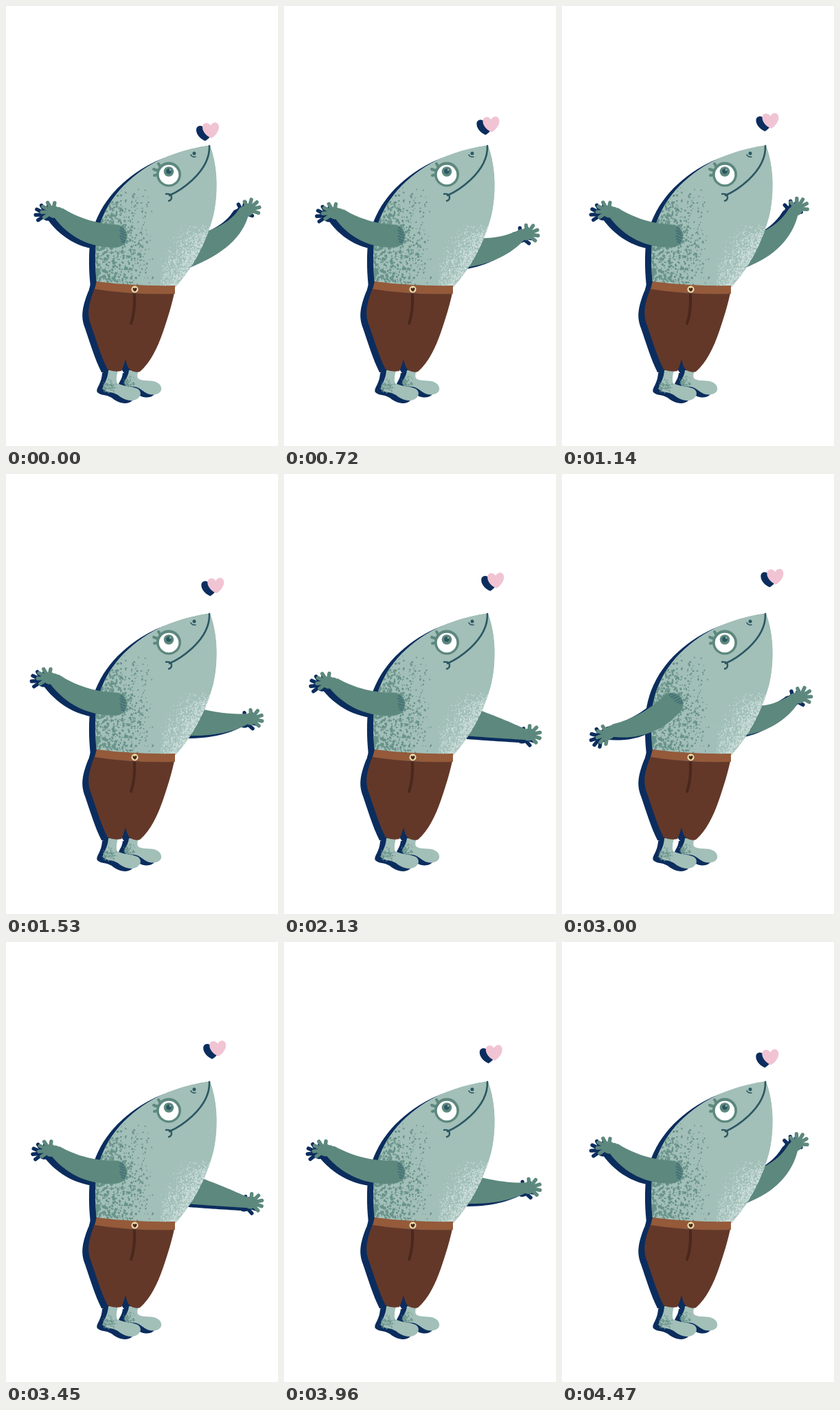
These frames come from a looping animation (396x639 px, 4500 ms). An HTML page with a canvas:

```html
<!DOCTYPE html>
<html lang="en">
<head>
<meta charset="utf-8">
<title>Fish blowing a heart</title>
<style>
html, body { margin: 0; width: 100%; height: 100%; overflow: hidden; background: #fff; }
canvas { display: block; width: 396px; height: 639px; }
</style>
</head>
<body>
<canvas id="stage" width="396" height="639"></canvas>
<script>
const ctx = document.getElementById('stage').getContext('2d');
const LOOP = 4500, TURN = 2790, STEP = 30;
const NAVY = '#0b2d5e', SKIN = '#a2bfb8', DEEP = '#5d887d', SPOT = '#68938a', INK = '#2b5863';
const PANTS = '#633829', BELT = '#945a3a', PINK = '#f1c4d3';
const rad = Math.PI / 180;

const body = new Path2D('M297 202 C262 207 232 217 206 233 C165 259 137 295 131 342 C129 365 130 385 132 404 L246 409 C272 381 292 343 302 305 C310 270 308 230 297 202Z');
const pants = new Path2D('M129 410 C119 435 118 448 124 464 C131 484 138 508 148 528 Q158 532 168 530 Q171 524 174 513 Q176 524 181 529 Q189 533 195 531 C211 517 221 495 228 475 C236 452 241 435 245 417 L187 418Z');
const belt = new Path2D('M132 400 Q185 407 246 406 L246 418 Q185 420 129 411Z');
const nearFoot = new Path2D('M149 529 L163 529 C161 537 160 543 162 548 C172 553 184 552 192 556 C199 561 196 569 188 572 C179 575 169 570 163 565 C155 560 147 562 142 557 C139 551 148 546 149 529Z');
const farFoot = new Path2D('M179 529 L193 529 C191 535 190 540 194 542 C204 546 214 542 222 548 C229 554 227 562 218 564 C208 566 202 561 195 556 C187 550 178 555 173 550 C171 543 178 540 179 529Z');
const heart = new Path2D('M1 11 C-4 9 -12 3 -12 -5 C-12 -12 -3 -13 0 -7 C3 -14 12 -13 12 -5 C12 2 6 8 1 11Z');

// Columns: time, then the pose values.
const leftKeys = [
  // drop in degrees, reach
  [0, 0, 1], [720, 0, .945], [1110, 0, 1.01], [1530, 0, 1.07],
  [1800, 14, 1.11], [2130, 3, 1.03], [2250, 49, 1.03], [2580, 46, 1.05], [2790, 46, 1.05]
];
const rightKeys = [
  // elbow x, y, wrist x, y, hand angle
  [0, 329, 339, 346, 299, -25], [540, 322, 352, 357, 318, -12],
  [720, 314, 357, 346, 332, -5], [1110, 318, 343, 336, 299, -42],
  [1530, 314, 366, 349, 356, -2], [2130, 309, 368, 349, 378, 5],
  [2220, 308, 372, 347, 390, 10], [2580, 309, 357, 339, 326, -15],
  [2790, 312, 352, 337, 316, -24]
];

function pose(keys, t) {
  let i = 1;
  while (i < keys.length - 1 && t > keys[i][0]) i++;
  const a = keys[i - 1], b = keys[i];
  const u = Math.min(1, (t - a[0]) / (b[0] - a[0]));
  const e = u * u * (3 - 2 * u);
  return a.slice(1).map((v, k) => v + (b[k + 1] - v) * e);
}

let seed = 7;
function random() {
  seed = (seed * 16807) % 2147483647;
  return seed / 2147483647;
}

// Spots grow with the local density.
function stipple(count, x0, y0, w, h, density, minSize, maxSize) {
  const path = new Path2D();
  for (let i = 0; i < count; i++) {
    const x = x0 + random() * w, y = y0 + random() * h;
    const d = density(x, y);
    if (random() > d) continue;
    const r = minSize + random() * (maxSize - minSize) * (.4 + .6 * d);
    const tilt = random() * 3;
    path.moveTo(x + r * Math.cos(tilt), y + r * Math.sin(tilt));
    path.ellipse(x, y, r, r * (.55 + random() * .4), tilt, 0, 7);
  }
  return path;
}

const darkSpots = stipple(2000, 128, 264, 96, 142,
  (x, y) => Math.max(0, 1 - (x - 130) / 86) * Math.min(1, (y - 220) / 90), .7, 2.7);
const lightSpots = stipple(3000, 225, 318, 78, 90, (x, y) => {
  const inward = (302 - (y - 315) * .62 - x) / 50;
  return inward > 1 ? 0 : Math.pow(1 - Math.max(0, inward), 1.4) * Math.min(1, (y - 300) / 40);
}, .5, 1.4);
const heelSpots = stipple(260, 140, 541, 22, 21,
  (x, y) => 1 - Math.hypot(x - 149, y - 553) / 13, .5, 1.5);
const farHeelSpots = stipple(200, 171, 537, 20, 18,
  (x, y) => 1 - Math.hypot(x - 178, y - 547) / 12, .5, 1.5);

function fill(path, color) {
  ctx.fillStyle = color;
  ctx.fill(path);
}

function disc(x, y, r, color) {
  ctx.fillStyle = color;
  ctx.beginPath();
  ctx.arc(x, y, r, 0, 7);
  ctx.fill();
}

function line(d, width, color) {
  ctx.strokeStyle = color;
  ctx.lineWidth = width;
  ctx.stroke(new Path2D(d));
}

// Tapered limb along a quadratic curve.
function limb(s, c, w, r0, r1, r2, color) {
  const upper = [], lower = [];
  for (let i = 0; i <= 16; i++) {
    const u = i / 16, v = 1 - u;
    const mix = (a, b, d) => v * v * a + 2 * u * v * b + u * u * d;
    const x = mix(s[0], c[0], w[0]), y = mix(s[1], c[1], w[1]);
    const dx = v * (c[0] - s[0]) + u * (w[0] - c[0]);
    const dy = v * (c[1] - s[1]) + u * (w[1] - c[1]);
    const k = mix(r0, r1, r2) / Math.hypot(dx, dy);
    upper.push([x + dy * k, y - dx * k]);
    lower.unshift([x - dy * k, y + dx * k]);
  }
  ctx.beginPath();
  upper.concat(lower).forEach(p => ctx.lineTo(p[0], p[1]));
  ctx.closePath();
  ctx.fillStyle = color;
  ctx.fill();
}

function hand(x, y, angle, side, color) {
  ctx.save();
  ctx.translate(x, y);
  ctx.rotate(angle);
  ctx.scale(1, side);
  disc(0, 0, 8, color);
  disc(7, 0, 9, color);
  ctx.strokeStyle = color;
  ctx.lineWidth = 5.4;
  [[-92, 13], [-50, 15], [-17, 16], [13, 16], [44, 15]].forEach(([a, len]) => {
    ctx.beginPath();
    ctx.moveTo(8, 0);
    ctx.lineTo(8 + len * Math.cos(a * rad), len * Math.sin(a * rad));
    ctx.stroke();
  });
  ctx.restore();
}

function rightArm(t, color) {
  const [ex, ey, wx, wy, angle] = pose(rightKeys, t);
  limb([262, 358], [ex, ey], [wx, wy], 22, 16, 8, color);
  hand(wx, wy, angle * rad, 1, color);
}

function leftArm(t, color) {
  const [drop, reach] = pose(leftKeys, t);
  ctx.save();
  const a = -drop * rad, cos = Math.cos(a), sin = Math.sin(a);
  const at = (x, y) => [160 + (x * cos - y * sin) * reach, 334 + (x * sin + y * cos) * reach];
  const wrist = at(-84, -34);
  disc(160, 334, 16.5, color);
  limb([160, 334], at(-48, 0), wrist, 16.5, 18.5, 9, color);
  hand(wrist[0], wrist[1], Math.PI + 10 * rad + a, -1, color);
  if (color !== NAVY) {
    ctx.translate(160, 334);
    ctx.rotate(a);
    line('M7 -12 L11 -9 M6 -8 L13 -5 M7 -4 L14 -1 M6 0 L14 3 M7 4 L13 7 M8 8 L12 10', 2, '#44717a');
  }
  ctx.restore();
}

function kiss(t, color) {
  ctx.save();
  ctx.translate(298 + t * .0048, 181 - t * .0122);
  fill(heart, color);
  ctx.restore();
}

function shadow(t) {
  ctx.save();
  ctx.translate(-9, 4);
  [body, pants, belt, nearFoot, farFoot].forEach(p => fill(p, NAVY));
  rightArm(t, NAVY);
  leftArm(t, NAVY);
  kiss(t, NAVY);
  ctx.restore();
}

function texturedBody() {
  ctx.save();
  ctx.clip(body);
  fill(body, SKIN);
  fill(darkSpots, SPOT);
  fill(lightSpots, '#cbdeda');
  ctx.restore();
}

function face() {
  line('M215 237 L221 239 M216 246 L221 245 M222 229 L225 234', 4, DEEP);
  disc(237, 244.5, 18, DEEP);
  disc(237, 245, 14.3, '#fff');
  disc(237, 240.5, 7.3, DEEP);
  disc(237, 240, 3.8, INK);
  disc(239, 238, 1.2, SKIN);
  line('M296 203 C297 222 287 238 271 253 C260 263 250 270 238 275', 2.6, INK);
  line('M233 273 Q241 272 241 278 Q241 282 237 283', 2.4, INK);
  disc(274, 214, 2.5, INK);
  line('M269 216 Q271 220 276 219', 1.6, INK);
}

function clothes() {
  fill(pants, PANTS);
  line('M187 419 Q188 445 182 461', 4, '#4a281d');
  fill(belt, BELT);
  disc(187.5, 411.5, 5, '#eedfae');
  ctx.save();
  ctx.translate(187.5, 412);
  ctx.scale(.25, .25);
  fill(heart, '#4a281d');
  ctx.restore();
}

function draw(t) {
  ctx.fillStyle = '#fff';
  ctx.fillRect(0, 0, 396, 639);
  ctx.lineCap = 'round';
  ctx.lineJoin = 'round';
  shadow(t);
  rightArm(t, DEEP);
  texturedBody();
  face();
  fill(farFoot, SKIN);
  fill(farHeelSpots, SPOT);
  fill(nearFoot, SKIN);
  fill(heelSpots, SPOT);
  clothes();
  leftArm(t, DEEP);
  kiss(t, PINK);
}

const start = performance.now();
function tick() {
  const elapsed = Math.max(0, performance.now() - start) % LOOP;
  const t = Math.floor(elapsed / STEP) * STEP;
  // The motion runs forward, then back along the same path.
  draw(t <= TURN ? t : 2 * TURN - t);
  requestAnimationFrame(tick);
}
tick();
</script>
</body>
</html>
```
